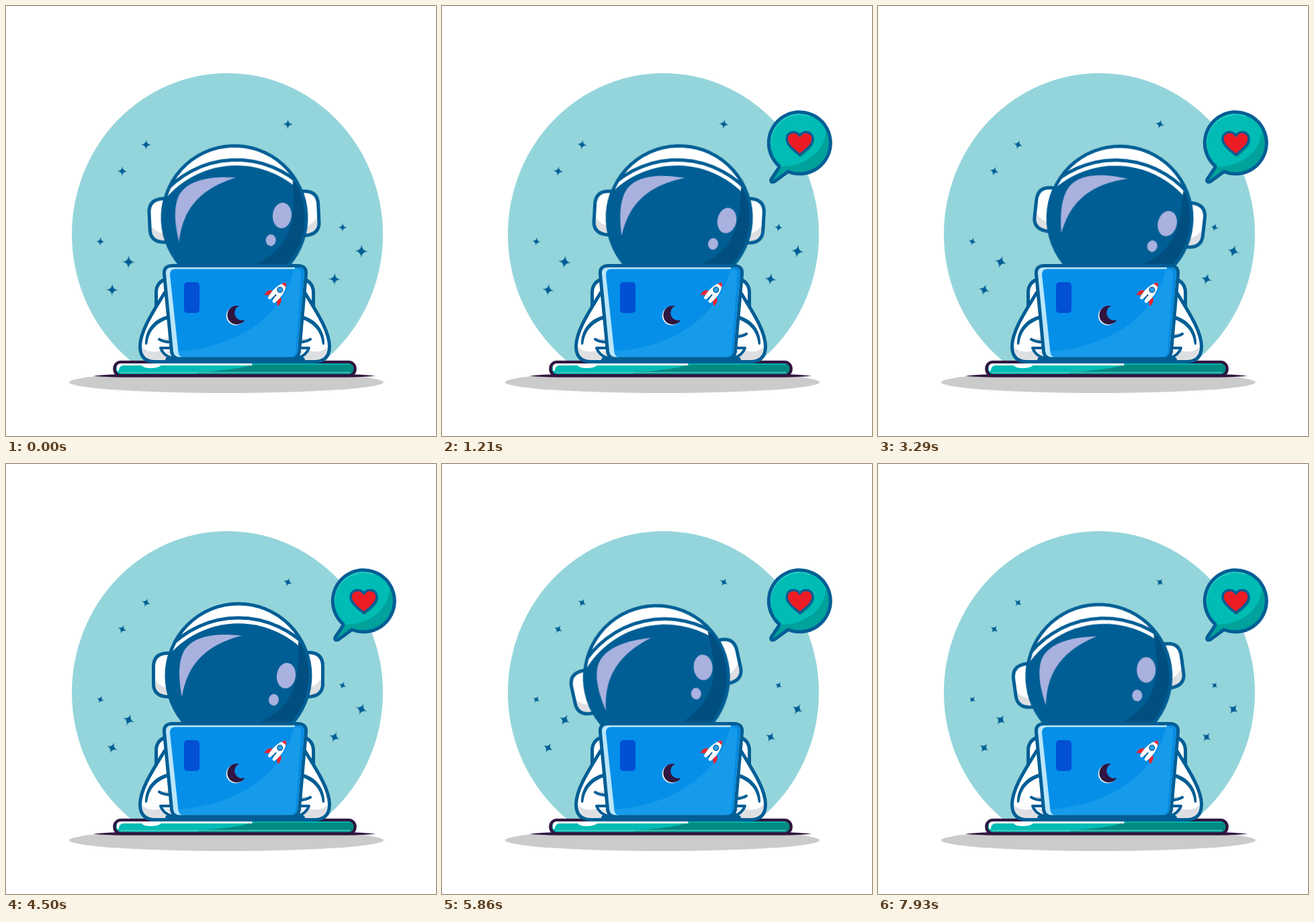
Recreate the animation shown at these times as an HTML page without scripts. Size 640x640 px, loop 8 s.

```html
<!DOCTYPE html>
<html lang="en">
<head>
<meta charset="utf-8">
<title>Astronaut at a laptop</title>
<style>
  html, body { margin: 0; width: 100%; height: 100%; overflow: hidden; background: #fff; }
  svg { display: block; width: 100vw; height: 100vh; }
  .ink { fill: #005e95; }
  .line { fill: none; stroke: #005e95; stroke-width: 5; stroke-linecap: round; stroke-linejoin: round; }
  .thin { stroke-width: 4; }
  .white { fill: #fff; }
  .grey { fill: #dedfe2; }
  .glow { fill: #a9b1df; }

  .head, .bubble, .spin, .pulse, .hand { animation: 8s linear infinite; }
  .head { transform-origin: 346px 440px; animation-name: tilt; }
  .bubble { transform-origin: 490px 264px; animation-name: pop; }
  .spin { animation-name: spin; }
  .pulse { animation-name: pulse; }
  .hand { animation-timing-function: ease-in-out; }
  .left { animation-name: typeLeft; }
  .right { animation-name: typeRight; }

  @keyframes tilt {
    0% { transform: rotate(-2.75deg); animation-timing-function: cubic-bezier(.3, .43, .6, 1); }
    35% { transform: rotate(6.9deg); animation-timing-function: cubic-bezier(.45, 0, .75, .42); }
    56.25% { transform: rotate(0deg); animation-timing-function: cubic-bezier(.2, .23, .5, 1); }
    74.4% { transform: rotate(-12.4deg); animation-timing-function: cubic-bezier(.45, 0, .8, .65); }
    100% { transform: rotate(-7.6deg); }
  }
  @keyframes pop {
    0%, 3.5% { transform: scale(0); animation-timing-function: cubic-bezier(.33, 0, .67, 1); }
    12%, 100% { transform: scale(1); }
  }
  @keyframes spin { to { transform: rotate(240deg); } }
  @keyframes pulse {
    0% { transform: scale(1); }
    15% { transform: scale(.86); }
    40% { transform: scale(.64); }
    58% { transform: scale(.46); }
    76% { transform: scale(.52); }
    100% { transform: scale(.68); }
  }
  @keyframes typeLeft {
    0%, 15%, 27%, 41%, 50%, 65%, 79%, 90%, 99%, 100% { transform: translateY(0); }
    8%, 21%, 34%, 46%, 56.2%, 72%, 84.5%, 94% { transform: translateY(-8px); }
  }
  @keyframes typeRight {
    0%, 9%, 21%, 35%, 46%, 56.2%, 65%, 75%, 85%, 99%, 100% { transform: translateY(0); }
    4%, 15.1%, 28%, 41.1%, 51%, 60%, 70%, 80%, 92% { transform: translateY(-8px); }
  }
</style>
</head>
<body>
<svg viewBox="0 0 640 640">
  <defs>
    <g id="star"><g class="spin"><g class="pulse">
      <path class="ink" d="M0-10Q.6-.6 10 0Q.6.6 0 10Q-.6.6-10 0Q-.6-.6 0-10Z"/>
    </g></g></g>
    <path id="heart" d="M532.500 222C525 215 513 208 513 197.500C513 187 527 184 532.500 193C538 184 552 187 552 197.500C552 208 540 215 532.500 222Z"/>
    <path id="balloon" d="M502 238.500A46 46 0 1 1 515 246.500L494.500 261.500Q488.500 263.500 490 258L500 243Q502 240 502 238.500Z"/>
    <path id="lid" d="M248 386.500H434Q447.500 386.500 446.500 399L436.500 514Q435 525 425 525H258Q248 525 246.500 514L235.500 399Q234.500 386.500 248 386.500Z"/>
    <path id="panel" d="M252 391.500H432Q440 391.500 439.500 399L431 514Q430 522.500 423 522.500H264Q257.500 522.500 256.500 515L244 400Q243.500 391.500 252 391.500Z"/>
    <g id="arm">
      <path class="white" d="M245 405Q224 407 223.500 426V455L245 470Z"/>
      <path class="line" d="M240 406Q224 410 223.500 426V447"/>
      <path class="white" d="M237 425C222 451 199 483 199.500 507Q200 530 224 530H250V425Z"/>
      <path class="grey" d="M202 507Q212 518 230 513L250 518V528H223Q204 528 202 507Z"/>
      <path class="line" d="M236 427C221 452 199.500 483 199.500 507Q200 529.500 222 529.500H250"/>
      <path class="ink" d="M244 460C222 464 207 480 207 503Q209 506 210.500 502C213 483 224 471 244 465Z"/>
    </g>
    <g id="cuff">
      <path class="white" d="M229 509H254V525H244Q233 521 229 509Z"/>
      <path class="line thin" d="M252 509H230Q234 520 247 524"/>
      <path class="grey" d="M238 514H254V520H245Z"/>
    </g>
    <g id="thumb">
      <path class="grey" d="M227 496Q234 494 248 495V501Q236 502 227 496Z"/>
      <path class="line thin" d="M228 496Q236 501 248 500"/>
    </g>
    <clipPath id="dome"><circle cx="346" cy="315" r="108"/></clipPath>
    <clipPath id="sky"><path d="M90 90H570V545H90Z"/></clipPath>
    <clipPath id="balloonClip"><use href="#balloon"/></clipPath>
    <clipPath id="panelClip"><use href="#panel"/></clipPath>
    <clipPath id="deskClip"><rect x="164" y="532" width="353" height="16" rx="7"/></clipPath>
  </defs>

  <ellipse cx="329.500" cy="340" rx="231.500" ry="240" fill="#94d5db" clip-path="url(#sky)"/>
  <use href="#star" transform="translate(208.500 206.500) scale(.75)"/>
  <use href="#star" transform="translate(419.500 176) scale(.75)"/>
  <use href="#star" transform="translate(173 246) scale(.75)"/>
  <use href="#star" transform="translate(140.500 350.500) scale(.67)"/>
  <use href="#star" transform="translate(182.500 381)"/>
  <use href="#star" transform="translate(158 422.500) scale(.92)"/>
  <use href="#star" transform="translate(501 329.500) scale(.67)"/>
  <use href="#star" transform="translate(529 365)"/>
  <use href="#star" transform="translate(489 406.500) scale(.92)"/>

  <!-- desk -->
  <ellipse cx="328" cy="560" rx="234" ry="16" fill="#cbcbcb"/>
  <path d="M130 550.500Q150 548 175 548H505Q530 548 550 550.500Q530 552.500 505 552.500H175Q150 552.500 130 550.500Z" fill="#301640"/>
  <rect x="161.500" y="530" width="358" height="20" rx="9.500" fill="#00bcb4" stroke="#301640" stroke-width="4.500"/>
  <g clip-path="url(#deskClip)">
    <path d="M368 533Q345 542 285 545V549H518V533Z" fill="#008a82"/>
    <path d="M170 532H370L366 535H231Q226 539 215 539Q205 539 202 535H174Q168 536 168 543H165V532Z" fill="#fff"/>
    <path d="M366 533H512" stroke="#00b3ab" stroke-width="2"/>
    <path d="M170 545.500H512" stroke="#55c9c4" stroke-width="1.500"/>
  </g>

  <!-- speech bubble -->
  <g class="bubble">
    <use href="#balloon" fill="#00bcb4"/>
    <g clip-path="url(#balloonClip)">
      <path d="M571 170C577 212 545 240 502 239L488 266H590V170Z" fill="#00a29b"/>
      <path d="M490 217A44 44 0 0 1 548 164" fill="none" stroke="#25cec6" stroke-width="2.500"/>
    </g>
    <use href="#balloon" class="line"/>
    <use href="#heart" transform="translate(2 3)" fill="#009a93"/>
    <use href="#heart" fill="#ed1c24" stroke="#005e95" stroke-width="3.500" stroke-linejoin="round"/>
  </g>

  <use href="#arm"/>
  <use href="#arm" transform="translate(681 0) scale(-1 1)"/>
  <g class="hand left"><use href="#thumb"/></g>
  <g class="hand right"><use href="#thumb" transform="translate(681 0) scale(-1 1)"/></g>
  <use href="#cuff"/>
  <use href="#cuff" transform="translate(681 0) scale(-1 1)"/>

  <g class="head">
    <path class="white" d="M246 281.500H240Q219.500 282 219.500 302V327Q219.500 346 242 346.500H250Z"/>
    <path class="grey" d="M221 319Q226 331 244 334V346Q221 346 221 319Z"/>
    <path class="line" d="M246 281.500H240Q219.500 282 219.500 302V327Q219.500 346 242 346.500"/>
    <path class="white" d="M446 280.500H451Q471.500 281 471.500 301V327Q471.500 346 449 346.500H442Z"/>
    <path class="grey" d="M470 317Q464 331 447 334V346Q470 346 470 317Z"/>
    <path class="line" d="M446 280.500H451Q471.500 281 471.500 301V327Q471.500 346 449 346.500"/>
    <circle class="white" cx="346" cy="315" r="107"/>
    <g clip-path="url(#dome)">
      <path class="ink" d="M238 290A137 137 0 0 1 454 290V430H238Z"/>
      <path class="line" d="M240 276A143 143 0 0 1 452 276"/>
      <path class="glow" d="M351 255.500C310 251 277 256 264 280C255 299 258 326 262 347C268 311 285 272 351 255.500Z"/>
      <ellipse class="glow" cx="417" cy="315" rx="14" ry="19" transform="rotate(8 417 315)"/>
      <ellipse class="glow" cx="398.500" cy="351" rx="7.500" ry="8.700" transform="rotate(8 398.500 351)"/>
      <path d="M435 264C438 331 425 364 372 387V425H460V288Q450 273 435 264Z" fill="#004f80"/>
    </g>
    <circle class="line" cx="346" cy="315" r="107"/>
  </g>

  <!-- laptop -->
  <rect class="ink" x="237" y="522" width="208" height="10" rx="5"/>
  <use href="#lid" fill="#b9e6fb"/>
  <path d="M430 389H435Q445 389 444 399L434 514Q433 523 425 523H418Z" fill="#078be2"/>
  <use href="#panel" fill="#058fe9"/>
  <path d="M429 391C416 454 352 508 256 514V523H436L446 391Z" fill="#169bea" clip-path="url(#panelClip)"/>
  <use href="#lid" class="line"/>
  <rect x="265" y="411" width="23" height="46" rx="5" fill="#0150d4"/>
  <path id="moon" class="white" transform="translate(-1.500 1)" d="M347 446.500A14 14 0 1 0 355.500 467A10.500 10.500 0 0 1 347 446.500Z"/>
  <path d="M347 446.500A14 14 0 1 0 355.500 467A10.500 10.500 0 0 1 347 446.500Z" fill="#301640"/>

  <g transform="translate(404 427) rotate(40)">
    <path d="M-8 2Q-15 5-13 15L-7 10ZM8 2Q15 5 13 15L7 10Z" fill="#e8252f"/>
    <path class="white" d="M0-20C8-12 9 4 6 15H2.500L0 5L-2.500 15H-6C-9 4-8-12 0-20Z"/>
    <path d="M0-20Q3-17 4.500-14Q0-16-4.500-14Q-3-17 0-20Z" fill="#e8252f"/>
    <path d="M0 3V12" stroke="#005e95" stroke-width="2"/>
    <circle cy="-6" r="4" fill="#2f9fe6" stroke="#005e95" stroke-width="1.200"/>
  </g>
</svg>
</body>
</html>
```
